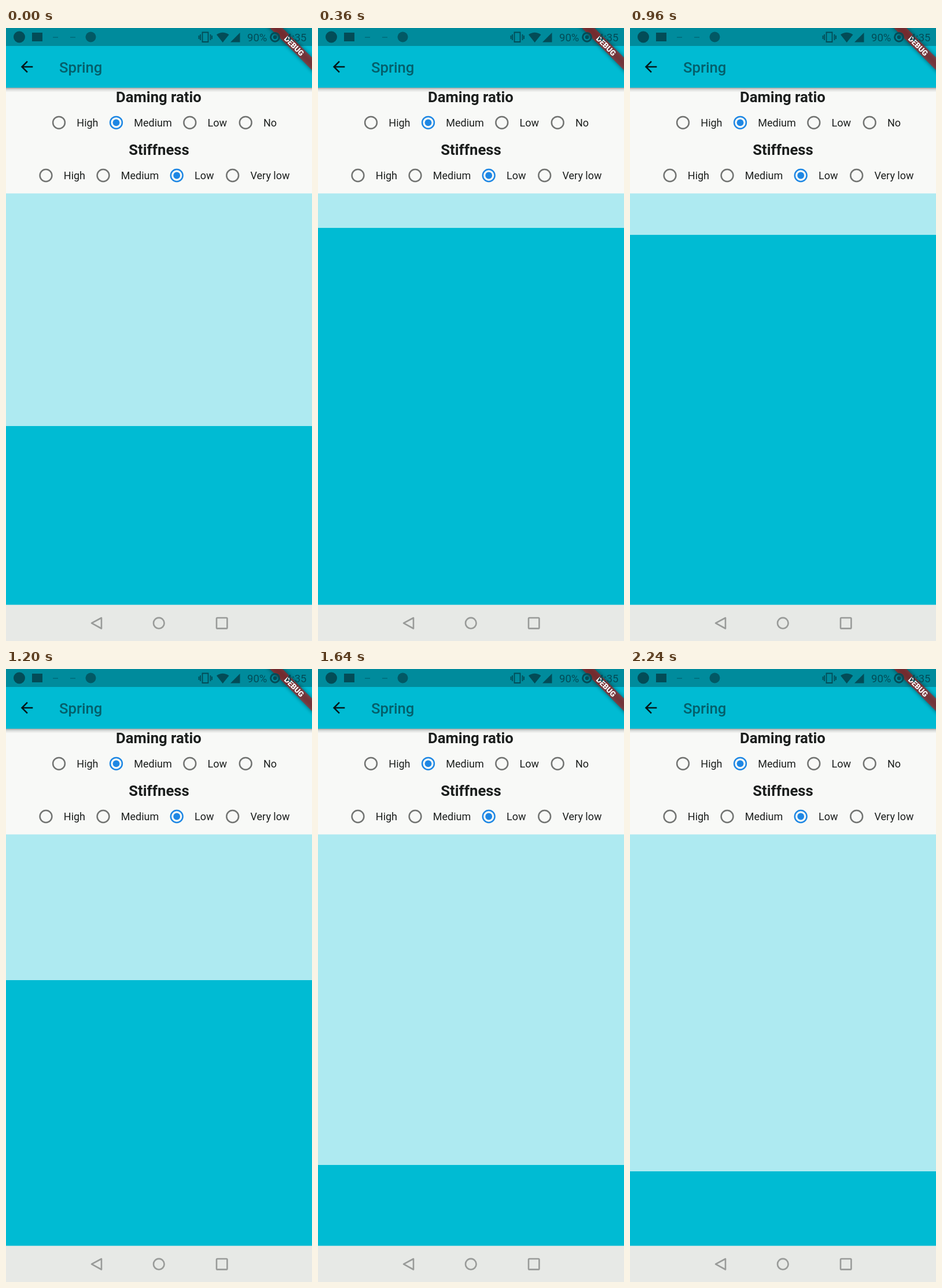
An HTML page that plays this animation: 529x1058 px, repeating every 3.36 s.

```html
<!DOCTYPE html>
<html lang="en">
<head>
<meta charset="utf-8">
<title>Spring</title>
<style>
  html, body { margin: 0; width: 100%; height: 100%; overflow: hidden; }
  svg { display: block; width: 529px; height: 1058px; font-family: Roboto, sans-serif; }
  .title { font-size: 25.7px; font-weight: 500; fill: #045f6b; }
  .head { font-size: 25.7px; font-weight: 700; fill: #1b1e1d; text-anchor: middle; }
  .label { font-size: 18px; fill: #1b1e1d; }
  .status { font-size: 18.5px; }
  .debug { font-size: 13.1px; font-weight: 900; fill: #fff; text-anchor: middle; }
</style>
</head>
<body>
<svg viewBox="0 0 529 1058">
  <defs>
    <linearGradient id="shade" x2="0" y2="1">
      <stop offset="0" stop-color="#000" stop-opacity=".34"/>
      <stop offset=".4" stop-color="#000" stop-opacity=".12"/>
      <stop offset="1" stop-color="#000" stop-opacity="0"/>
    </linearGradient>
    <filter id="blur" x="-20%" y="-100%" width="140%" height="300%">
      <feGaussianBlur stdDeviation="3.5"/>
    </filter>
  </defs>

  <rect width="529" height="1058" fill="#f8f9f7"/>
  <rect y="285.5" width="529" height="711" fill="#aeeaf1"/>
  <rect id="sheet" width="529" fill="#00bbd3"/>

  <!-- app bar -->
  <rect y="103" width="529" height="8" fill="url(#shade)"/>
  <rect width="529" height="103" fill="#00bbd3"/>
  <rect width="529" height="31" fill="#008b9c"/>
  <path transform="translate(20.6 51.6) scale(1.287)"
        d="M20 11H7.83l5.59-5.59L12 4l-8 8 8 8 1.41-1.41L7.83 13H20z" fill="#04191c"/>
  <text class="title" x="92" y="76.5">Spring</text>

  <!-- options -->
  <text class="head" x="264" y="127.5">Daming ratio</text>
  <text class="head" x="264.5" y="218.5">Stiffness</text>
  <g id="options"></g>

  <!-- debug ribbon -->
  <g transform="translate(529 0) rotate(45)">
    <rect x="-60" y="36" width="120" height="15.5" opacity=".5" filter="url(#blur)"/>
    <rect x="-60" y="36" width="120" height="15.5" fill="#b71c1c" fill-opacity=".63"/>
    <text class="debug" x="0" y="48.4">DEBUG</text>
  </g>

  <!-- status bar -->
  <g fill="#034c57">
    <circle cx="23" cy="15.5" r="10"/>
    <rect x="45" y="8" width="18" height="15"/>
    <path d="M81 15.5h9v1.3h-9zM111 15.5h9v1.3h-9z" opacity=".6"/>
    <circle cx="146.5" cy="15.5" r="9" opacity=".8"/>
    <path d="M339.5 7.5h10v16.5h-10zM336 11v10M353.5 11v10M333.5 13v6M356 13v6"
          fill="none" stroke="#034c57" stroke-width="1.8"/>
    <path d="M364 11.5Q374.500 4 385.500 11.500L374.700 25z"/>
    <path d="M404.500 8v16.500H388z"/>
    <text class="status" x="417" y="22.5">90%</text>
    <circle cx="465" cy="15.8" r="7.4" fill="none" stroke="#034c57" stroke-width="3"/>
    <circle cx="465" cy="15.8" r="3.4"/>
    <text class="status" x="519.500" y="22.5" text-anchor="end">4:35</text>
  </g>

  <!-- navigation bar -->
  <rect y="995.5" width="529" height="62.5" fill="#e7e9e6"/>
  <g fill="none" stroke="#999b99" stroke-width="2.6" stroke-linejoin="round">
    <path d="M165 1018v18.500L148 1027.200z"/>
    <circle cx="264.300" cy="1027.200" r="9.300"/>
    <rect x="364" y="1018" width="18.400" height="18.400" rx="1.500"/>
  </g>
</svg>
<script>
const sheet = document.getElementById("sheet");
const LOOP = 3360, STEP = 40, TOP = 357, REST = 867, BOTTOM = 996;

function radio(x, y, label, on) {
  const color = on ? "#1e87e4" : "#727472";
  return `<circle cx="${x}" cy="${y}" r="10.4" fill="none" stroke="${color}" stroke-width="2.5"/>` +
    (on ? `<circle cx="${x}" cy="${y}" r="5.9" fill="${color}"/>` : "") +
    `<text class="label" x="${x + 30.8}" y="${y + 6.7}">${label}</text>`;
}

function row(y, xs, labels, chosen) {
  return labels.map((label, i) => radio(xs[i], y, label, i === chosen)).join("");
}

document.getElementById("options").innerHTML =
  row(163.3, [91.5, 190.5, 317.8, 414.2], ["High", "Medium", "Low", "No"], 1) +
  row(254.5, [69, 168, 295.2, 391.7], ["High", "Medium", "Low", "Very low"], 2);

// Damped spring: stiffness 200, damping ratio 0.5; time in ms
function spring(ms, cos, sin) {
  const t = ms / 1000, w = Math.sqrt(150);
  return Math.exp(-Math.sqrt(50) * t) * (cos * Math.cos(w * t) + sin * Math.sin(w * t));
}

function edge(t) {
  if (t < 1060) return TOP + spring(t, 330, 51);
  if (t < 1160) return TOP + 0.0094 * (t - 1060) ** 2; // dragged by hand
  return REST + spring(t - 1316.6, 0, 146);
}

function draw(now) {
  const t = Math.floor((now % LOOP) / STEP) * STEP;
  const y = Math.round(edge(t));
  sheet.setAttribute("y", y);
  sheet.setAttribute("height", BOTTOM - y);
  requestAnimationFrame(draw);
}
draw(0);
</script>
</body>
</html>
```
